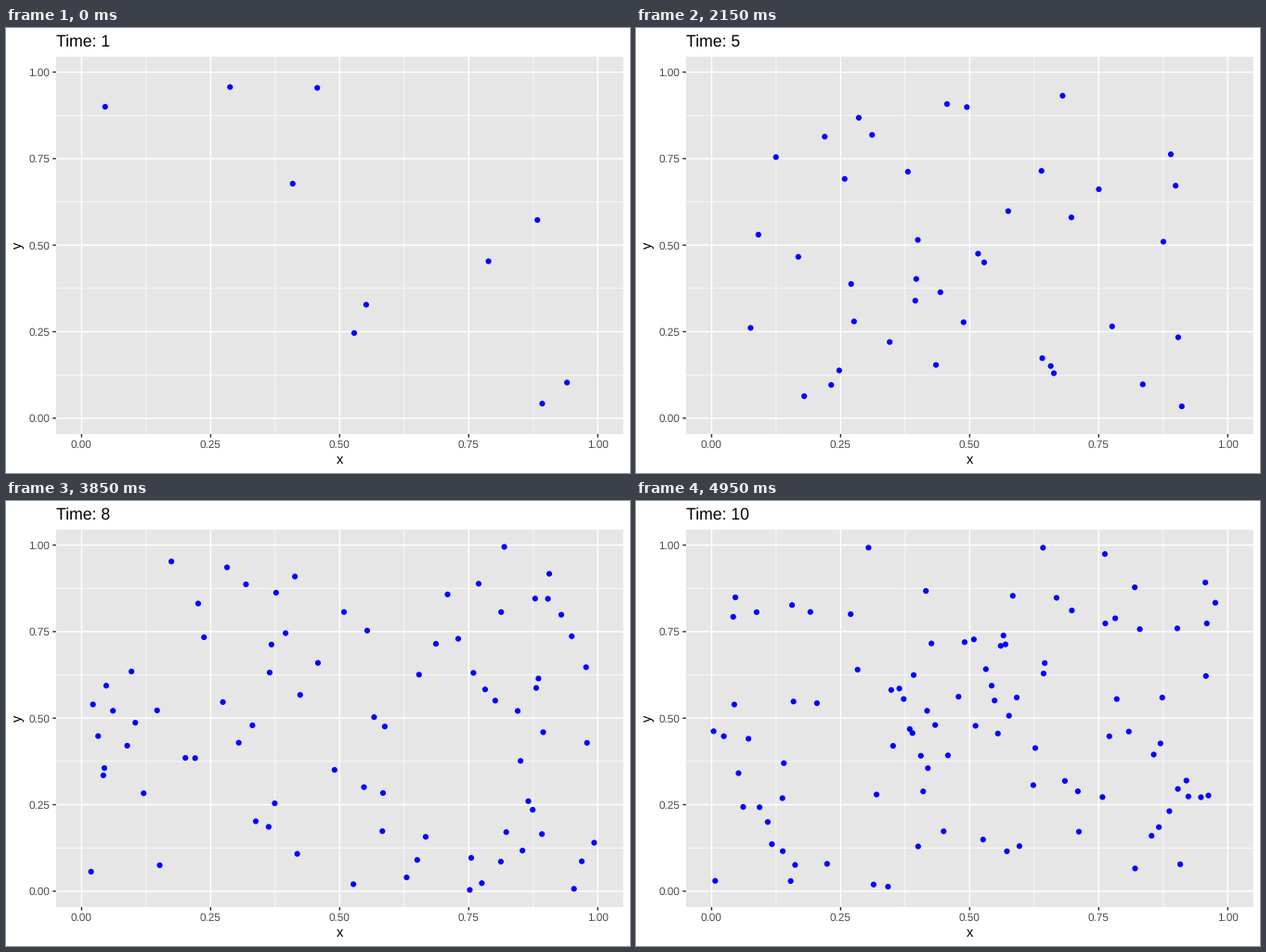
Recreate the animation shown at these times as a matplotlib script. Size 672x480 px, loop 5 s.

```python
import random

import matplotlib.pyplot as plt
import numpy as np
from matplotlib.animation import FuncAnimation
from matplotlib.patches import Rectangle

W, H, DPI = 672, 480, 96
LEFT, RIGHT, TOP, BOTTOM = 53.9, 664.7, 30.95, 438.0
STATES, STEPS = 10, 11
FRAMES, INTERVAL = 100, 50
TICK = 3.65
TEXT_GAP = 6.57
POINT_SIZE = 21.5

plt.rcParams["font.family"] = "Liberation Sans"
plt.rcParams["text.hinting"] = "none"


def seeded_twister(seed):
    """Mersenne Twister whose state is filled by a linear congruential rule."""
    words = []
    for _ in range(50 + 625):
        seed = (69069 * seed + 1) % 2**32
        words.append(seed)
    rng = random.Random()
    rng.setstate((3, tuple(words[51:]) + (624,), None))
    return rng


rng = seeded_twister(123)


def uniform(n):
    return np.array([rng.getrandbits(32) / (2**32 - 1) for _ in range(n)])


def make_state(n):
    x = uniform(n)
    y = uniform(n)
    return np.column_stack([x, y])


def px(points_px):
    """Pixels to typographic points."""
    return points_px * 72 / DPI


# State k holds 10 * k points.
states = [make_state(10 * k) for k in range(1, STATES + 1)]
cloud = np.vstack(states)
pad = 0.05 * np.ptp(cloud, axis=0)
low = cloud.min(axis=0) - pad
high = cloud.max(axis=0) + pad


def to_x(v):
    return LEFT + (v - low[0]) / (high[0] - low[0]) * (RIGHT - LEFT)


def to_y(v):
    return BOTTOM - (v - low[1]) / (high[1] - low[1]) * (BOTTOM - TOP)


fig = plt.figure(figsize=(W / DPI, H / DPI), dpi=DPI, facecolor="white")
ax = fig.add_axes([0, 0, 1, 1])
ax.set_xlim(0, W)
ax.set_ylim(H, 0)
ax.axis("off")


def line(x0, y0, x1, y1, color, width, z):
    ax.plot([x0, x1], [y0, y1], color=color, lw=px(width), zorder=z,
            snap=False, solid_capstyle="butt")


def label(x, y, text, size, color="black", **kw):
    return ax.text(x, y, text, fontsize=size, color=color,
                   va="baseline", **kw)


ax.add_patch(Rectangle((LEFT, TOP), RIGHT - LEFT, BOTTOM - TOP,
                       fc="#E6E6E6", ec="none", lw=0, zorder=0, snap=False))

for i in range(9):
    v = i / 8
    major = i % 2 == 0
    x, y = to_x(v), to_y(v)
    width, z = (1.42, 2) if major else (0.71, 1)
    line(LEFT, y, RIGHT, y, "white", width, z)
    line(x, TOP, x, BOTTOM, "white", width, z)
    if major:
        line(LEFT - TICK, y, LEFT, y, "#333333", 1.42, 3)
        line(x, BOTTOM, x, BOTTOM + TICK, "#333333", 1.42, 3)
        label(LEFT - TEXT_GAP, y + 4.2, f"{v:.2f}", 8.8, "#4D4D4D",
              ha="right")
        label(x, 453.0, f"{v:.2f}", 8.8, "#4D4D4D", ha="center")

label((LEFT + RIGHT) / 2, 469.6, "x", 11, ha="center")
label(17.8, (TOP + BOTTOM) / 2, "y", 11, ha="center",
      rotation=90, rotation_mode="anchor")
title = label(LEFT, 19.9, "", 13.2, ha="left")
dots = ax.scatter([], [], color="#0000FF", linewidths=0, zorder=4)


def draw(frame):
    k, step = divmod(frame, STEPS)
    points = states[k]
    if step:
        goal = states[k + 1][:len(points)]
        points = points + (goal - points) * step / STEPS
    dots.set_offsets(np.column_stack([to_x(points[:, 0]),
                                      to_y(points[:, 1])]))
    # One size per dot keeps their sub-pixel positions.
    dots.set_sizes(np.full(len(points), POINT_SIZE), dpi=DPI)
    title.set_text(f"Time: {round(1 + frame / STEPS)}")
    return dots, title


anim = FuncAnimation(fig, draw, frames=FRAMES, interval=INTERVAL,
                     repeat=True, repeat_delay=0)
plt.show()
```
